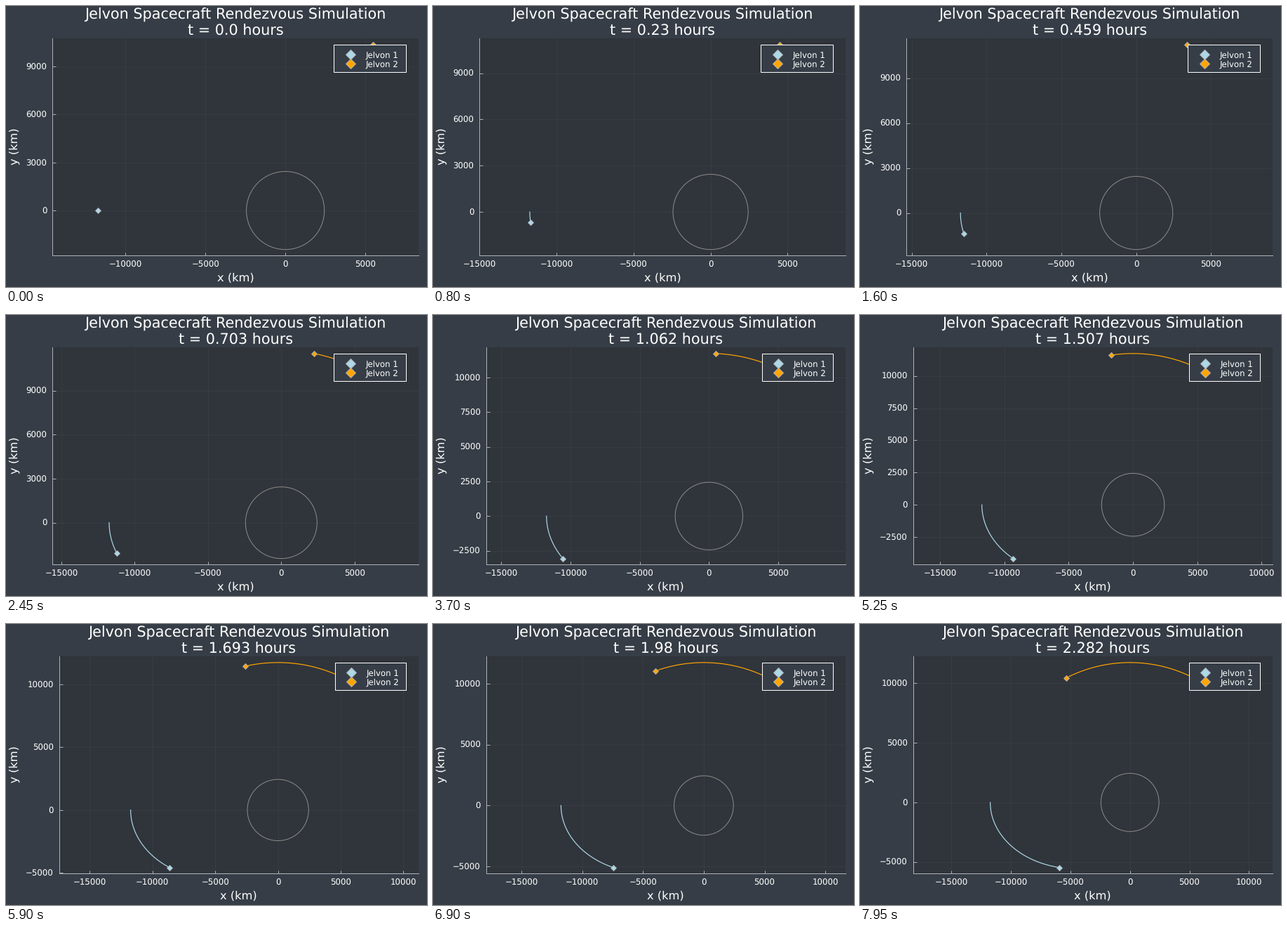
A matplotlib script for the animation above (8 s loop, 600 px wide and 400 px high).

```python
import numpy as np
import matplotlib.pyplot as plt
from matplotlib.animation import FuncAnimation
from matplotlib.patches import Circle, Rectangle

W, H, DPI = 600, 400, 100
FRAMES, INTERVAL = 160, 50
BG, INSIDE, FG = "#363D46", "#30343B", "#ADB2B7"
COLORS = ("lightblue", "orange")
TOP, BOTTOM, RIGHT = 46.1, 355.4, 587.7

# Two-body motion around the planet (km, s)
MU, PLANET, R_HIGH, R_LOW = 22032.0, 2440.0, 11740.0, 2640.0
STEP_HOURS = 0.01435
NICE = {1000: 1.0, 5000: 0.9, 2000: 0.7, 2500: 0.5, 3000: 0.2}


def pt(px):
    return px * 72 / DPI


def ellipse_track(t):
    """Fall from the far point of a transfer ellipse."""
    a = (R_HIGH + R_LOW) / 2
    ecc = (R_HIGH - R_LOW) / (R_HIGH + R_LOW)
    mean = np.sqrt(MU / a**3) * t
    e = mean / (1 + ecc)
    for _ in range(12):
        e = e - (e + ecc * np.sin(e) - mean) / (1 + ecc * np.cos(e))
    return -a * (ecc + np.cos(e)), -np.sqrt(R_HIGH * R_LOW) * np.sin(e)


def circle_track(t):
    angle = np.radians(62.1) + np.sqrt(MU / R_HIGH**3) * t
    return R_HIGH * np.cos(angle), R_HIGH * np.sin(angle)


def ticks_in(lo, hi, step):
    return np.arange(int(np.ceil(lo / step)), int(np.floor(hi / step)) + 1) * step


def best_ticks(lo, hi):
    """Pick the step with the best mix of count, coverage and roundness."""
    best, best_score = None, -1.0
    for step, nice in NICE.items():
        ticks = ticks_in(lo, hi, step)
        n = len(ticks)
        if not 4 <= n <= 8:
            continue
        score = (1 - abs(n - 5) / 5) / 4 + nice / 4
        score += 0.5 * (hi - lo) / ((n - 1) * step)
        if score > best_score:
            best, best_score = ticks, score
    return best


def label(v):
    return str(v).replace("-", "\u2212")


def label_ems(s):
    return sum(0.838 if c == "\u2212" else 0.636 for c in s)


seconds = np.arange(FRAMES) * STEP_HOURS * 3600
tracks = (ellipse_track(seconds), circle_track(seconds))
x_mid = (tracks[0][0][0] + tracks[1][0][0]) / 2

plt.rcParams["font.family"] = "DejaVu Sans"
plt.rcParams["text.hinting"] = "none"
fig = plt.figure(figsize=(W / DPI, H / DPI), dpi=DPI, facecolor=BG)

ax = fig.add_axes([0.1, 0.1, 0.8, 0.8], facecolor=INSIDE)
ax.set_axisbelow(True)
ax.grid(color=FG, alpha=0.06, lw=pt(1))
for side in ("top", "right"):
    ax.spines[side].set_visible(False)
for side in ("left", "bottom"):
    ax.spines[side].set(color=FG, linewidth=pt(1))
ax.tick_params(direction="in", length=pt(4.5), width=pt(1), color=FG,
               labelcolor="white", labelsize=pt(11.8))
ax.tick_params(axis="x", pad=pt(7.8))
ax.tick_params(axis="y", pad=pt(7.9))
ax.add_patch(Circle((0, 0), PLANET, fill=False, ec="#8C8B87", lw=pt(1)))

trails, ships = [], []
for i, color in enumerate(COLORS):
    trails += ax.plot([], [], color=color, lw=pt(1.2), zorder=3 + i)
    ships += ax.plot([], [], "D", ms=pt(5.6), mfc=color, mec=FG,
                     mew=pt(0.9), zorder=3.5 + i)

# Overlay in stage pixels for the titles and the legend
stage = fig.add_axes([0, 0, 1, 1], zorder=5)
stage.set(xlim=(0, W), ylim=(H, 0))
stage.axis("off")


def write(x, y, s, size, **kw):
    return stage.text(x, y, s, color="white", fontsize=pt(size),
                      va="baseline", **kw)


title = write(0, 18.5, "Jelvon Spacecraft Rendezvous Simulation", 20.75,
              ha="center")
clock = write(0, 42, "", 20.75, ha="center")
x_name = write(0, 391.7, "x (km)", 16.2, ha="center")
write(16.2, 199.7, "y (km)", 16.2, ha="center", rotation=90,
      rotation_mode="anchor")

box = stage.add_patch(Rectangle((0, 55.4), 1, 39, fc=BG, ec="white",
                                lw=pt(1), zorder=1))
keys, names = [], []
for i, color in enumerate(COLORS):
    y = 69.1 + 12.9 * i
    keys += stage.plot([0], [y], "D", ms=pt(9.2), mfc=color, mec=FG,
                       mew=pt(1), zorder=2 + i)
    names.append(write(0, y + 4.3, f"Jelvon {i + 1}", 11.8))


def layout(left):
    ax.set_position([left / W, 1 - BOTTOM / H,
                     (RIGHT - left) / W, (BOTTOM - TOP) / H])
    mid = (left + RIGHT) / 2
    for text in (title, clock, x_name):
        text.set_x(mid)
    shift = left - 66.4
    box.set_x(467.4 + 0.14 * shift)
    box.set_width(102.8 - 0.11 * shift)
    for key, name in zip(keys, names):
        key.set_xdata([490.9 + 0.11 * shift])
        name.set_x(512.4 + 0.08 * shift)


def draw(n):
    for (x, y), trail, ship in zip(tracks, trails, ships):
        trail.set_data(x[:n + 1], y[:n + 1])
        ship.set_data([x[n]], [y[n]])

    lo = min(-PLANET, tracks[0][1][:n + 1].min())
    hi = tracks[1][1][:n + 1].max()
    pad = 0.03 * (hi - lo)
    lo, hi = lo - pad, hi + pad
    y_ticks = best_ticks(lo, hi)
    y_labels = [label(v) for v in y_ticks]
    left = 37.85 + 11.22 * max(map(label_ems, y_labels))
    layout(left)

    # Equal scale on both axes, set by the height
    half = (hi - lo) / (BOTTOM - TOP) * (RIGHT - left) / 2
    x_ticks = ticks_in(x_mid - half, x_mid + half, 5000)
    ax.set_xticks(x_ticks, [label(v) for v in x_ticks])
    ax.set_yticks(y_ticks, y_labels)
    ax.set(xlim=(x_mid - half, x_mid + half), ylim=(lo, hi))
    clock.set_text(f"t = {round(n * STEP_HOURS, 3)} hours")
    return []


anim = FuncAnimation(fig, draw, frames=FRAMES, interval=INTERVAL,
                     repeat=True, repeat_delay=0, cache_frame_data=False)
plt.show()
```
